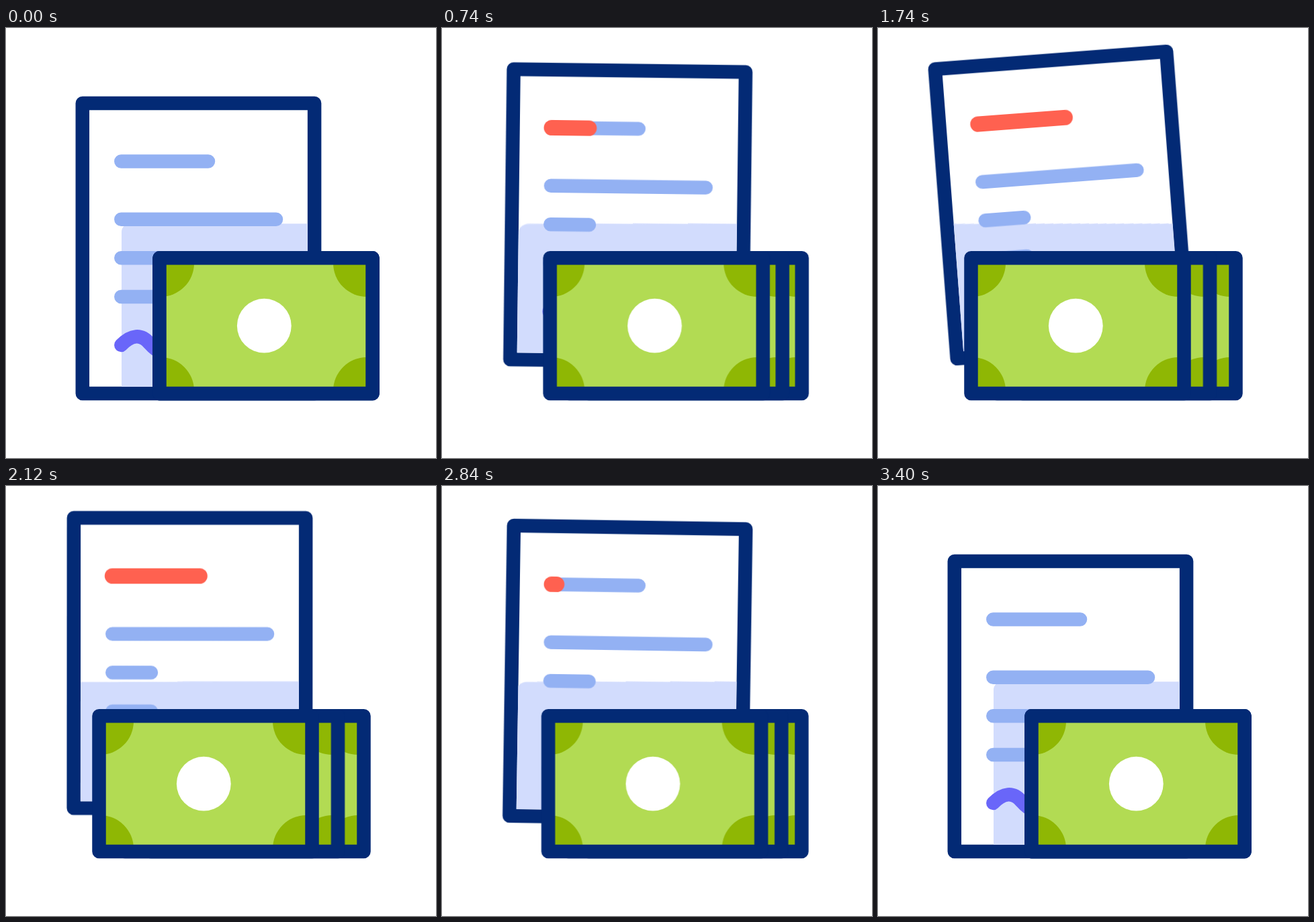
An HTML page that plays this animation: 640x640 px, repeating every 3620 ms.

```html
<!DOCTYPE html>
<html lang="en">
<head>
<meta charset="utf-8">
<title>Document and banknotes</title>
<style>
  html, body { margin: 0; width: 100%; height: 100%; overflow: hidden; background: #fff; }
  svg { display: block; width: 100%; height: 100%; }

  .slide, .turn, .mark, .spark {
    animation: 3620ms cubic-bezier(.3333, 0, .6667, 1) infinite;
  }
  .slide { animation-name: slide; }
  .turn { animation-name: turn; transform-origin: 286.5px 328px; }
  .mark { animation-name: mark; }
  .spark { animation-name: trim, fade; }

  /* --dx, --dy: full travel; --k: direction of the swing */
  .page { --dx: -13px; --dy: -64.5px; --k: 1; }
  .fixed { --dx: 13px; --dy: 64.5px; --k: -1; }
  .back { --dx: -13px; --dy: 0px; }
  .mid { --dx: -51.5px; --dy: 0px; }
  .front { --dx: -90px; --dy: 0px; }

  @keyframes slide {
    0%, 5.525% { transform: translate(0px, 0px); }
    27.624%, 71.823% { transform: translate(var(--dx), var(--dy)); }
    93.923%, 100% { transform: translate(0px, 0px); }
  }
  @keyframes turn {
    0%, 16.575% { transform: rotate(0deg); }
    33.149% { transform: rotate(calc(var(--k) * 5deg)); }
    50.829% { transform: rotate(calc(var(--k) * -5deg)); }
    66.298% { transform: rotate(calc(var(--k) * 5deg)); }
    82.873%, 100% { transform: rotate(0deg); }
  }
  @keyframes mark {
    0%, 15.469% { stroke-dasharray: 0 200; opacity: 0; }
    15.47% { stroke-dasharray: 0 200; opacity: 1; }
    26.519%, 69.061% { stroke-dasharray: 130 200; opacity: 1; }
    80.11% { stroke-dasharray: 0 200; opacity: 1; }
    80.111%, 100% { stroke-dasharray: 0 200; opacity: 0; }
  }
  @keyframes trim {
    0%, 82.873% { stroke-dasharray: 0 100; stroke-dashoffset: 0; }
    89.503% { stroke-dasharray: 30 100; stroke-dashoffset: 0; }
    93.923%, 100% { stroke-dasharray: 0 100; stroke-dashoffset: -30; }
  }
  @keyframes fade {
    0%, 82.873% { opacity: 0; }
    88.398%, 89.503% { opacity: 1; }
    93.923%, 100% { opacity: 0; }
  }

  .frame { stroke: #032a75; stroke-width: 20.5; stroke-linejoin: round; }
  .lines, .spark, .mark { fill: none; stroke-linecap: round; stroke-width: 20.5; }
  .lines { stroke: #93b1f3; }
  .sign { stroke: #6966f9; }
  .mark { stroke: #ff6150; stroke-width: 23; }
  .spark { stroke: #ff6150; opacity: 0; }
  .shade { fill: #d2dcfd; }
</style>
</head>
<body>
<svg viewBox="0 0 640 640">
  <defs>
    <clipPath id="inside"><rect x="124.3" y="122.3" width="324.2" height="411.2"/></clipPath>
    <clipPath id="note"><rect x="228.5" y="342.5" width="317" height="201.5"/></clipPath>
    <g id="bill">
      <rect x="228.5" y="342.5" width="317" height="201.5" fill="#b2db53"/>
      <g clip-path="url(#note)" fill="#8fb704">
        <circle cx="230" cy="350" r="50"/>
        <circle cx="537" cy="350" r="50"/>
        <circle cx="230" cy="540" r="50"/>
        <circle cx="537" cy="540" r="50"/>
      </g>
      <circle cx="384.3" cy="443.2" r="40.4" fill="#fff"/>
      <rect class="frame" x="228.5" y="342.3" width="317" height="201.7" fill="none"/>
    </g>
  </defs>

  <g class="page slide">
    <g class="turn">
      <rect class="frame" x="113.8" y="112" width="345.3" height="432" fill="#fff"/>
      <!-- The shade stays level while the page clips it -->
      <g clip-path="url(#inside)">
        <g class="fixed turn"><g class="fixed slide">
          <rect class="shade back slide" x="172" y="291.5" width="420" height="300" rx="12"/>
          <rect class="shade front slide" x="180" y="291.5" width="420" height="300" rx="17"/>
        </g></g>
      </g>
      <path class="lines" d="M171.3 198.5H301M171.3 284.8H402M171.3 342.3H229M171.3 400H229"/>
      <path class="lines sign" d="M171.3 472C186 457 201 454 214 470Q222 479 232 484"/>
      <path class="mark" d="M171.3 198.5H301.3"/>
    </g>
  </g>

  <use href="#bill" class="back slide"/>
  <use href="#bill" class="mid slide"/>
  <use href="#bill" class="front slide"/>

  <path class="spark" d="M493.2 295v-30"/>
  <path class="spark" d="M569 311l21.2 -21.2"/>
  <path class="spark" d="M577.5 377.8h30"/>
</svg>
</body>
</html>
```
